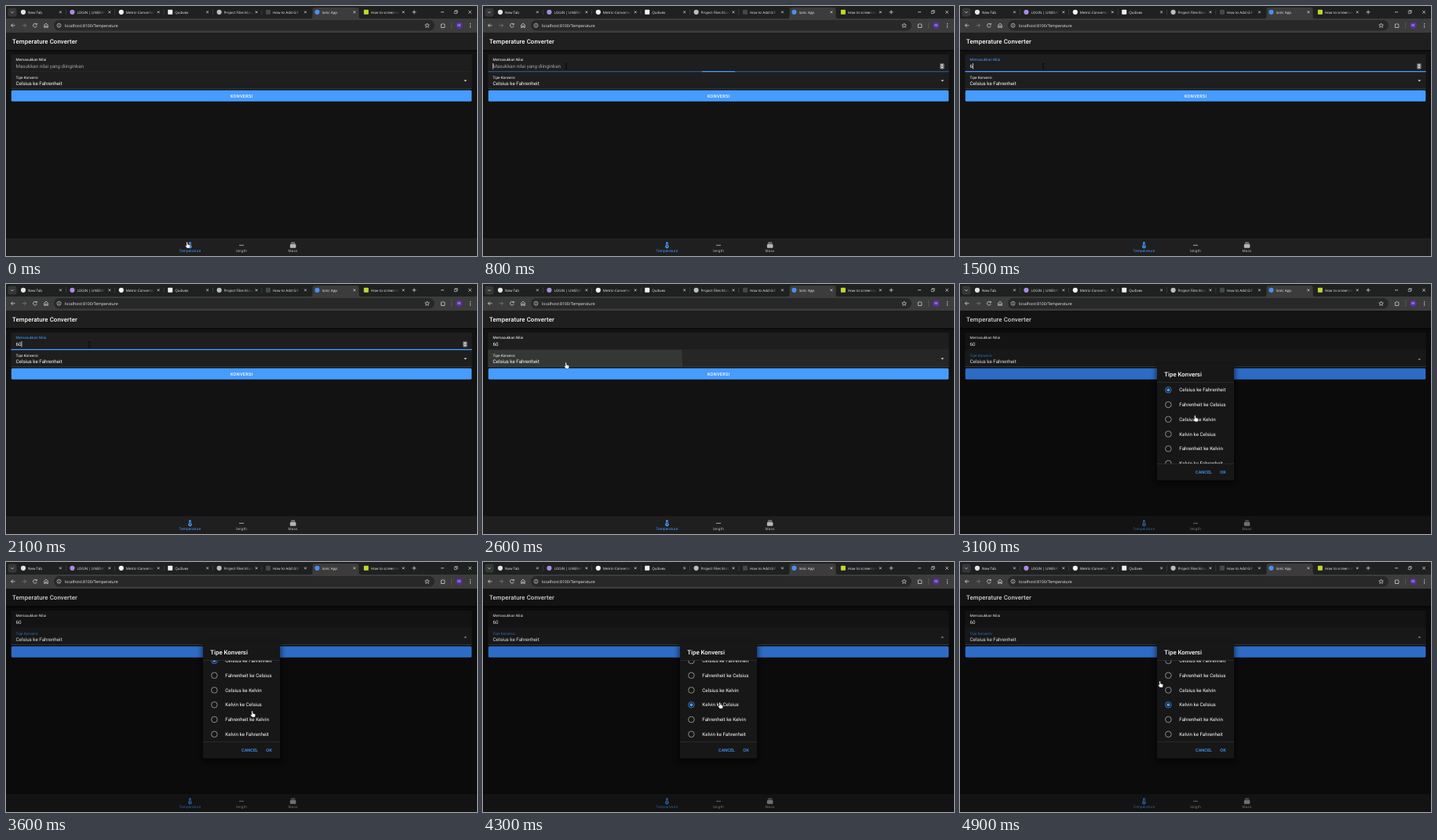
Animation of 600 by 319 pixels, one loop 5 s. Source, as an HTML page:

```html
<!DOCTYPE html>
<html lang="id">
<head>
<meta charset="utf-8">
<title>Temperature Converter</title>
<style>
  html, body { margin: 0; width: 100%; height: 100%; overflow: hidden; background: #121212; }
  #stage { display: block; width: 600px; height: 319px; }
  text { font-family: Roboto, sans-serif; fill: #fff; white-space: pre; text-rendering: geometricPrecision; }
  .ui { font-family: "Open Sans", "Noto Sans", sans-serif; fill: #ececec; }
  .line { fill: none; stroke: #d5d5d5; stroke-width: .8; }
</style>
</head>
<body>
<svg id="stage" viewBox="0 0 600 319" xmlns="http://www.w3.org/2000/svg"></svg>
<script>
const BLUE = '#469cff', DIM_BLUE = '#2d6cc6';
const stage = document.getElementById('stage');

const rect = (x, y, w, h, fill, more = '') =>
  `<rect x="${x}" y="${y}" width="${w}" height="${h}" fill="${fill}" ${more}/>`;
const text = (x, y, s, size, more = '') =>
  `<text x="${x}" y="${y}" font-size="${size}" ${more}>${s}</text>`;
const line = (d, more = '') => `<path class="line" d="${d}" ${more}/>`;
const dot = (x, y, r, fill, more = '') =>
  `<circle cx="${x}" cy="${y}" r="${r}" fill="${fill}" ${more}/>`;
const cross = (x, y, r) => line(`M${x - r} ${y - r}l${2 * r} ${2 * r}m0 ${-2 * r}l${-2 * r} ${2 * r}`);

// Browser window
const tabs = [
  ['New Tab', '#e4e4e4'], ['LOGIN | UNSRAT', '#a98be0'], ['Metric-Converter', '#f4f4f4'],
  ['Quibvex', '#f0f0f0', 1], ['Project Files Mana', '#b9bdc1'], ['How to Add GIF', '#45484a', 1],
  ['Ionic App', '#4b8df0'], ['How to screen re', '#c3d82c', 1]
];
const ACTIVE = 6;

function tab([title, color, square], i) {
  const x = 22 + i * 62.4, on = i === ACTIVE;
  return (on ? `<path d="M388 16q2.500 0 2.500-3V5q0-3 3-3h53q3 0 3 3v8q0 3 2.500 3z" fill="#3c3c3c"/>` : '') +
    (square ? rect(x - 3, 4.8, 6, 6, color, 'rx=".7"') : dot(x, 7.8, 3.1, color)) +
    `<svg x="${x + 6}" y="2" width="36" height="13">${text(0, 7.6, title, 4.55, 'class="ui"')}
     ${rect(27, 0, 9, 13, `url(#${on ? 'fadeOn' : 'fade'})`)}</svg>` +
    cross(x + 47.4, 7.8, 1.4) +
    (i < 5 ? rect(x + 54, 4.5, .6, 7, '#4b4b4b') : '');
}

const fade = (id, c) => `<linearGradient id="${id}"><stop stop-color="${c}" stop-opacity="0"/>
  <stop offset="1" stop-color="${c}"/></linearGradient>`;

const chrome = rect(0, 0, 600, 17, '#1f2020') +
  rect(2.5, 2.5, 11, 11, '#363737', 'rx="3"') + line('M6.300 7.200l1.700 1.700 1.700-1.700') +
  tabs.map(tab).join('') +
  line('M517.500 7.800h5M520 5.300v5') + line('M554 7.800h4') +
  line('M571.200 6.600h3v3h-3zM572.200 6.600v-1h3v3h-1', 'style="stroke-width:.6"') + cross(591, 7.8, 1.8) +
  rect(0, 16, 600, 18, '#3c3c3c') + rect(61, 18, 485, 13.6, '#282828', 'rx="6.800"') +
  line('M11.500 24.800h-5m2.300-2.300l-2.300 2.300 2.300 2.300') +
  line('M20.500 24.800h5m-2.300-2.300l2.300 2.300-2.300 2.300', 'opacity=".4"') +
  line('M39 23.400a2.400 2.400 0 1 0 .3 2.100M39.300 22v1.800h-1.800') +
  line('M48.700 24.200l2.300-2 2.300 2v3.200h-1.500v-2h-1.600v2h-1.500z') +
  dot(67.5, 24.8, 2.5, 'none', 'stroke="#d5d5d5" stroke-width=".7"') + line('M67.500 24.500v1.700M67.500 23.200v.6') +
  text(75, 26.6, 'localhost:8100/Temperature', 5.16, 'class="ui"') +
  line('M536.500 22l.8 1.900 2 .2-1.500 1.300.5 2-1.800-1.100-1.800 1.100.5-2-1.500-1.300 2-.2z', 'style="stroke-width:.7"') +
  line('M554.300 23.200h1.400q.8-1.600 1.600 0h1.400v1.300q1.400.7 0 1.500v1.500h-4.400z') +
  rect(567.5, 21, .6, 8, '#666') +
  dot(577.3, 24.8, 4.1, '#5a2fa8') + text(577.3, 26.4, 'M', 4.3, 'class="ui" text-anchor="middle"') +
  [22.6, 24.8, 27].map(y => dot(591.5, y, .65, '#ddd')).join('');

// Page
const tabLabel = (x, s, color) =>
  text(x, 314.3, s, 4.7, `text-anchor="middle" letter-spacing=".130" style="fill:${color}"`);

const page = rect(0, 33.5, 600, 286, '#121212') +
  rect(0, 56, 600, 2, '#0b0b0b') + rect(0, 33.5, 600, 22.5, '#1f1f1f') +
  rect(6.5, 62, 587, 44, '#1e1e1e') +
  rect(6.5, 84, 587, 22, '#262626', 'id="hover"') +
  `<svg x="6.500" y="84" width="587" height="22"><circle id="ripple" cx="99.500" cy="18" fill="#343835"/></svg>` +
  rect(6.5, 83.5, 587, .6, '#2a2a2a') + rect(6.5, 105.3, 587, .6, '#454545', 'id="under"') +
  rect(6.5, 83.2, 587, 1, '#2c5f9e', 'id="dim"') + rect(0, 83, 0, 1.2, BLUE, 'id="bright"') +
  rect(12.6, 73, .7, 7.5, '#fff', 'id="caret"') +
  `<g id="spin">${rect(582, 73.2, 5.6, 7.2, '#777', 'rx=".8"')}
   <path d="M583.200 76l1.600-1.800 1.600 1.800zM583.200 77.600l1.600 1.800 1.600-1.800z" fill="#fff"/></g>` +
  '<path id="arrow" d="M583.200 94.400h4l-2 2z" fill="#ddd"/>' +
  rect(0, 297, 600, 22, '#1f1f1f') + rect(0, 296.7, 600, .5, '#2a2a2a') +
  `<path d="M233.100 305.200v-2.800a1.300 1.300 0 0 1 2.600 0v2.800a2.200 2.200 0 1 1-2.600 0z" fill="${BLUE}"/>` +
  rect(234.1, 303, .6, 4, '#1f1f1f') + dot(234.4, 307, .8, '#1f1f1f') +
  rect(297, 304.8, 6, .9, '#b5b5b5') +
  rect(363.3, 301.5, 4.6, .8, '#b5b5b5') + rect(362.6, 302.7, 6, .8, '#b5b5b5') +
  rect(361.8, 304, 7.6, 4.7, '#b5b5b5', 'rx="1"') +
  tabLabel(234.4, 'Temperature', BLUE) + tabLabel(300, 'length', '#b5b5b5') + tabLabel(365.6, 'Mass', '#b5b5b5') +
  rect(0, 34, 600, 285, '#000', 'id="shade"');

// Parts that stay clear while the page is shaded
const words =
  text(8, 47.7, 'Temperature Converter', 7.8, 'id="heading" font-weight="500" letter-spacing=".097"') +
  text(12.5, 70.3, 'Memasukkan Nilai', 4.7, 'id="label"') +
  text(12.5, 79, '', 6.25, 'id="value"') +
  text(12.5, 92.6, 'Tipe Konversi', 4.7, 'id="kind"') +
  text(12.5, 101, 'Celsius ke Fahrenheit', 6.25, 'id="mode"') +
  rect(6.8, 107.4, 586.4, 14.4, BLUE, 'id="button" rx="1.500"') +
  text(300.2, 116.8, 'KONVERSI', 5.47, 'id="go" text-anchor="middle" font-weight="500" letter-spacing=".330"');

// Dialog
const options = ['Celsius ke Fahrenheit', 'Fahrenheit ke Celsius', 'Celsius ke Kelvin',
  'Kelvin ke Celsius', 'Fahrenheit ke Kelvin', 'Kelvin ke Fahrenheit'];
const STEP = 18.75;
const choice = (s, i) => {
  const y = 9.7 + i * STEP;
  return dot(14.4, y, 3.8, 'none', 'class="ring" stroke-width=".7"') +
    dot(14.4, y, 2, BLUE, 'class="pick"') + text(28.3, y + 2.2, s, 6.25);
};
const action = (x, s) => text(x, 242.3, s, 5.47, `font-weight="500" letter-spacing=".060" style="fill:${BLUE}"`);

const dialog = `<g id="dialog">
   ${rect(249, 104, 102, 151, '#000', 'rx="4" opacity=".5" filter="url(#blur)"')}
   ${rect(251, 102, 98, 148.5, '#171717', 'rx="1.500"')}
   ${text(260.3, 117.8, 'Tipe Konversi', 7.8, 'font-weight="500"')}
   <svg x="251" y="125.500" width="98" height="103.500"><g id="list">${options.map(choice).join('')}</g></svg>
   ${rect(251, 125, 98, .5, '#3a3a3a')}${rect(251, 229, 98, .5, '#3a3a3a')}
   ${action(300, 'CANCEL')}${action(331.3, 'OK')}</g>`;

// Pointers, each drawn around the middle of its shape
const pointers = `<g id="pointer">
  <path id="hand" d="M-1.200-3.600q.9-.9 1.500 0l.3 2.800 2.500.8q.8.300.6 1.200l-.5 2.800h-3.700l-2-2.700q-.2-.9.700-.8l.8.600z"
    fill="#fff" stroke="#111" stroke-width=".4"/>
  <path id="beam" d="M-1-3.500h2M0-3.500v7M-1 3.500h2" stroke="#050505" stroke-width=".8"/>
  <path id="tip" d="M-2-4v7l1.600-1.500 1.100 2.500 1.200-.5-1.100-2.400h2.200z" fill="#fff" stroke="#111" stroke-width=".5"/>
  </g>`;

stage.innerHTML = `<defs>${fade('fade', '#1f2020')}${fade('fadeOn', '#3c3c3c')}
  <filter id="blur" x="-20%" y="-20%" width="140%" height="140%"><feGaussianBlur stdDeviation="3"/></filter></defs>` +
  page + words + chrome + dialog + pointers;

const el = id => document.getElementById(id);
const set = (id, attrs) => { for (const k in attrs) el(id).setAttribute(k, attrs[k]); };
const show = (id, on) => { el(id).style.display = on ? '' : 'none'; };
const clamp = v => Math.max(0, Math.min(1, v));
const ease = v => (v = clamp(v), v * v * (3 - 2 * v));

// time, x, y
const path = [[0, 231, 305], [100, 229, 301], [600, 106, 77], [2100, 106, 77], [2400, 106, 104],
  [2600, 106, 104], [2700, 180, 117], [2800, 273.5, 136], [3300, 314, 191], [3600, 314, 194],
  [4000, 302, 184], [4300, 302, 183], [4800, 255, 156], [5000, 255, 156]];

function pointerAt(t) {
  const i = path.findIndex(p => p[0] > t);
  const [t0, x0, y0] = path[i - 1], [t1, x1, y1] = path[i];
  const k = ease((t - t0) / (t1 - t0));
  return [x0 + (x1 - x0) * k, y0 + (y1 - y0) * k];
}

function draw(t) {
  const [x, y] = pointerAt(t);
  const open = clamp((t - 2600) / 200);
  const focus = t >= 700 && t < 2500;
  const overInput = !open && y > 62 && y < 84;
  const overSelect = !open && y >= 84 && y < 106;

  set('pointer', { transform: `translate(${x} ${y})` });
  const shape = overInput ? 'beam' :
    open || y > 297 || y >= 84 && y < 122 ? 'hand' : 'tip';
  for (const id of ['hand', 'beam', 'tip']) show(id, id === shape);

  // Value field
  const typed = t < 1400 ? '' : t < 1700 ? '6' : '60';
  el('value').textContent = typed || 'Masukkan nilai yang diinginkan';
  el('value').style.fill = typed ? '#fff' : '#a2a2a2';
  el('label').style.fill = focus && t >= 900 ? BLUE : '#fff';
  show('dim', focus);
  const w = focus ? 587 * clamp(t < 800 ? 0 : t < 900 ? .072 : (t - 700) / 300) : 0;
  set('bright', { x: 300 - w / 2, width: w });
  const since = t - (t < 1400 ? 700 : t < 1700 ? 1400 : 1700);
  show('caret', focus && since % 1000 < 500);
  set('caret', { x: 12.5 + typed.length * 3.55 });
  show('spin', focus || overInput);

  // Select field
  show('hover', overSelect || open);
  const grow = t - 2500;
  show('ripple', grow >= 0 && grow < 300);
  set('ripple', { r: Math.max(0, 60 + grow * .88), opacity: grow < 200 ? 1 : .5 });
  set('under', { fill: open ? '#7a7a7a' : '#454545' });
  el('kind').style.fill = open ? DIM_BLUE : '#fff';
  set('arrow', { transform: open ? 'rotate(180 585.2 95.6)' : '' });

  // Dialog
  set('shade', { opacity: .38 * open });
  set('heading', { opacity: 1 - .2 * open });
  for (const id of ['label', 'value', 'mode']) set(id, { opacity: 1 - .12 * open });
  set('button', { fill: open ? DIM_BLUE : BLUE });
  set('go', { opacity: 1 - open });
  const size = .9 + .1 * open;
  set('dialog', { opacity: open, transform: `translate(300 176) scale(${size}) translate(-300 -176)` });
  set('list', { transform: `translate(0 ${-9.2 * ease((t - 3200) / 300)})` });
  const chosen = t < 4200 ? 0 : 3;
  const rings = document.querySelectorAll('.ring'), picks = document.querySelectorAll('.pick');
  options.forEach((_, i) => {
    rings[i].setAttribute('stroke', i === chosen ? BLUE : '#bbb');
    picks[i].style.display = i === chosen ? '' : 'none';
  });
}

const start = performance.now();
function tick() {
  const t = (performance.now() - start) % 5000;
  draw(Math.floor(t / 100) * 100);
  requestAnimationFrame(tick);
}
tick();
</script>
</body>
</html>
```
